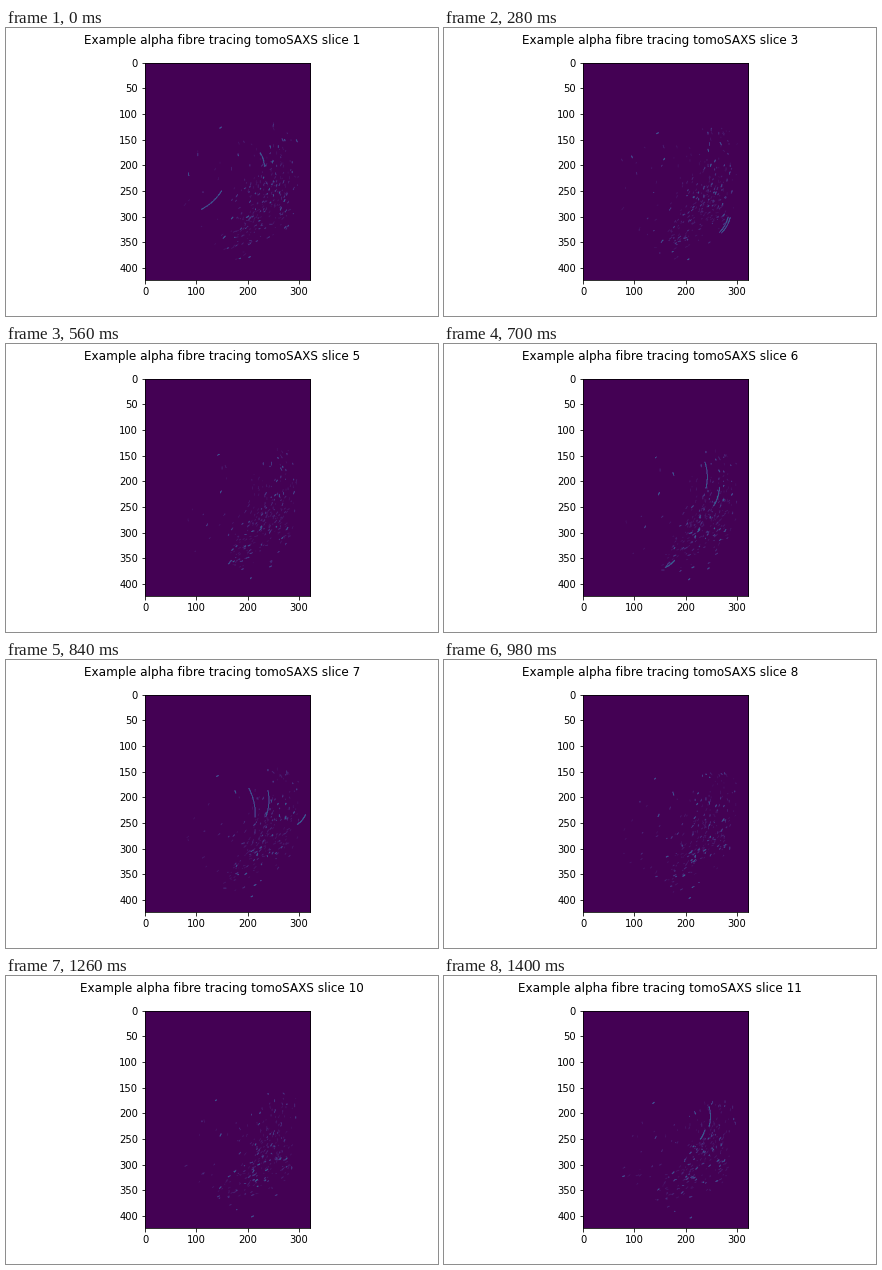
These frames come from a looping animation (432x288 px, 1.54 s). A matplotlib script:

```python
import numpy as np
import matplotlib.pyplot as plt
from matplotlib.animation import FuncAnimation

ROWS, COLS = 424, 322
SLICES = 11
STEP_MS = 140
DRIFT = 6.0   # downward shift of the tissue per slice, in voxels
REACH = 1.3   # slices over which a short fibre stays visible
BOW = 0.07    # sideways bulge of a long fibre, relative to its length

# The longest fibres: slice, then both end points in voxels.
LONG = [
    (1, 109, 286, 148, 250), (1, 223, 176, 231, 203),
    (3, 264, 331, 281, 301), (3, 268, 332, 285, 302),
    (6, 236, 163, 238, 214), (6, 253, 248, 264, 212),
    (6, 159, 368, 177, 354), (7, 201, 183, 213, 239),
    (7, 238, 187, 234, 238), (7, 295, 253, 311, 234),
    (9, 172, 294, 188, 259), (9, 217, 169, 222, 212),
    (11, 244, 187, 244, 226), (11, 227, 251, 235, 234),
]


def trace(img, xs, ys, value):
    """Raise the voxels along a curve to the given value."""
    cols = np.clip(np.rint(xs).astype(int), 0, COLS - 1)
    rows = np.clip(np.rint(ys).astype(int), 0, ROWS - 1)
    img[rows, cols] = np.maximum(img[rows, cols], value)


def trace_long(img, x0, y0, x1, y1):
    """Draw a fibre that bulges to the right."""
    t = np.linspace(0, 1, 90)
    bulge = 4 * BOW * t * (1 - t)
    xs = x0 + (x1 - x0) * t + abs(y1 - y0) * bulge
    ys = y0 + (y1 - y0) * t + (x1 - x0) * bulge * np.sign(y0 - y1)
    trace(img, xs, ys, 0.5)


def top_edge(depth):
    return 105 + DRIFT * (depth - 1)


def inside(x, y, depth):
    """Outline of the tissue: slanted top, rounded lower right."""
    roof = top_edge(depth) + 0.35 * abs(x - 255)
    floor = 395 - 130 * (max(x - 205, 0) / 95) ** 2 - 0.55 * max(190 - x, 0)
    return x < 299 and roof < y < floor


def random_place(rng, depth):
    """Pick from the core, the lower band, the sparse left or the right rim."""
    part = rng.choice(4, p=[0.36, 0.36, 0.07, 0.21])
    if part == 0:
        return rng.normal(238, 28), rng.normal(252 + 2 * depth, 48)
    if part == 1:
        t = rng.random()
        return (165 + 90 * t + rng.normal(0, 14),
                364 - 112 * t + rng.normal(0, 18))
    if part == 2:
        return rng.uniform(70, 215), rng.uniform(top_edge(depth) + 40, 345)
    return rng.normal(268, 17), rng.uniform(top_edge(depth), 320)


def make_fibres(count=1500):
    """Short fibres, each centred on its own depth."""
    rng = np.random.default_rng(12)
    fibres = []
    while len(fibres) < count:
        depth = rng.uniform(-1, 13)
        x, y = random_place(rng, depth)
        if not inside(x, y, depth):
            continue
        # upright near the top, flatter towards the lower left
        angle = np.interp(y, [150, 260, 360], [105, 62, 25])
        angle = np.radians(angle + rng.normal(0, 14))
        length = rng.uniform(1, 6)
        value = 0.07 + 0.45 * rng.random() ** 4
        fibres.append((depth, x, y, angle, length, value))
    return fibres


def make_slice(n, fibres):
    img = np.zeros((ROWS, COLS))
    t = np.linspace(-0.5, 0.5, 20)
    for depth, x, y, angle, length, value in fibres:
        away = n - depth
        if abs(away) < REACH:
            xs = x + t * length * np.cos(angle)
            ys = y + 0.6 * DRIFT * away - t * length * np.sin(angle)
            trace(img, xs, ys, value)
    for depth, *ends in LONG:
        if depth == n:
            trace_long(img, *ends)
    # two lone specks that sink steadily through the stack
    for x, y in ((147 - n, 122 + 5.3 * n), (202 + 0.6 * n, 376 + 2.5 * n)):
        trace(img, x + 3 * t, y - 2 * t, 0.45)
    return img


fibres = make_fibres()
volume = [make_slice(n, fibres) for n in range(1, SLICES + 1)]

plt.rcParams["font.family"] = "DejaVu Sans"
fig, ax = plt.subplots(figsize=(6, 4), dpi=72, facecolor="white")
fig.subplots_adjust(left=0.125, right=0.9, bottom=0.125, top=0.88)
picture = ax.imshow(volume[0], cmap="viridis", vmin=0, vmax=1)
ax.set_xticks(range(0, 301, 100))
ax.set_yticks(range(0, 401, 50))
title = fig.suptitle("", fontsize=12)


def update(i):
    picture.set_data(volume[i])
    title.set_text(f"Example alpha fibre tracing tomoSAXS slice {i + 1}")
    return picture, title


anim = FuncAnimation(fig, update, frames=SLICES, interval=STEP_MS,
                     repeat=True, repeat_delay=0, blit=False)
plt.show()
```
